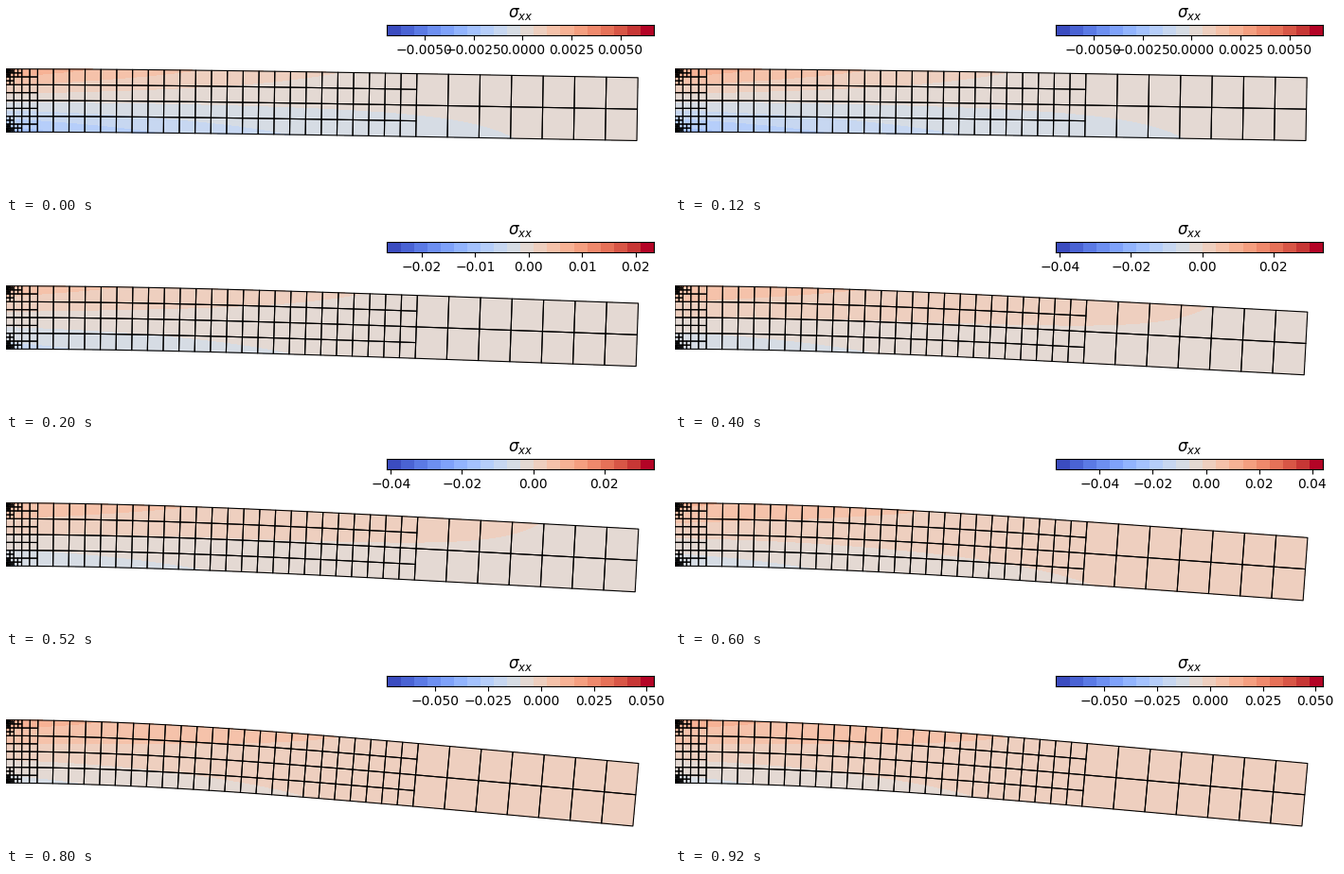
A matplotlib script that plays this animation: 700 px wide and 200 px high, repeating every 1 s.

```python
import numpy as np
import matplotlib.pyplot as plt
from matplotlib.animation import FuncAnimation
from matplotlib.collections import PolyCollection

WIDTH, HEIGHT, DPI = 700, 200, 100
UNIT = 200 / 3            # pixels per beam height
LENGTH = 10 * UNIT
MID_Y = 100
TIP_STEP = 9.15           # tip deflection added per load step
STRESS_STEP = 0.0026      # root bending stress added per load step
BANDS = 20

# stress minimum, stress maximum, tick spacing, decimals
SCALES = [
    (-0.00690, 0.00671, 0.0025, 4),
    (-0.02645, 0.02345, 0.01, 2),
    (-0.04100, 0.03390, 0.02, 2),
    (-0.05630, 0.04400, 0.02, 2),
    (-0.07290, 0.05350, 0.025, 3),
]

cmap = plt.get_cmap("coolwarm", BANDS)


def needs_split(x, y, size):
    if size > 0.25:
        return x < 6.5
    if size > 0.125:
        return x < 0.5
    edge = min(y, 1 - y - size)
    return size > 0.02 and x + edge < 1.9 * size


def refine(x, y, size):
    """Yield the leaf cells of the adaptive grid."""
    if not needs_split(x, y, size):
        yield x, y, size
        return
    half = size / 2
    for dx in (0, half):
        for dy in (0, half):
            yield from refine(x + dx, y + dy, half)


def corners(x, y, size):
    return [(x, y), (x + size, y), (x + size, y + size), (x, y + size)]


cells = np.array([
    corners(*cell)
    for i in range(20) for j in range(2)
    for cell in refine(i / 2, j / 2, 0.5)
]) * UNIT

arc = np.linspace(0, 1, 401)
shape = 0.99 * (6 * arc**2 - 4 * arc**3 + arc**4) / 3 + 0.01 * (2 * arc - arc**2)


def bend(x, y, load):
    """Move rest points to their place on the cantilever under uniform load."""
    s = x / LENGTH
    sag = load * TIP_STEP * shape
    slope = np.gradient(sag, arc * LENGTH)
    step = (slope[1:]**2 + slope[:-1]**2) / 4 * LENGTH / 400
    shortening = np.concatenate([[0], np.cumsum(step)])
    angle = np.arctan(np.interp(s, arc, slope))
    offset = y - UNIT / 2
    return (x - np.interp(s, arc, shortening) - offset * np.sin(angle),
            MID_Y + np.interp(s, arc, sag) + offset * np.cos(angle))


def stress(x, y, load, low, high):
    eta = 1 - 2 * y / UNIT
    bending = load * STRESS_STEP * (1 - x / LENGTH)**2 * eta
    top = high * np.exp(-np.hypot(x, y) / 2)
    bottom = low * np.exp(-np.hypot(x, UNIT - y) / 2)
    return np.clip(bending + top + bottom, low, high)


rest_x, rest_y = np.meshgrid(
    np.concatenate([np.arange(0, 20, 0.5), np.linspace(20, LENGTH, 320)]),
    np.linspace(0, UNIT, 134))

fig = plt.figure(figsize=(WIDTH / DPI, HEIGHT / DPI), dpi=DPI, facecolor="white")
beam_ax = fig.add_axes([0, 0, 1, 1])
bar_ax = fig.add_axes([402.5 / WIDTH, 1 - 30.5 / HEIGHT, 281.5 / WIDTH, 10 / HEIGHT])


def draw_beam(load, low, high):
    beam_ax.clear()
    beam_ax.set(xlim=(0, WIDTH), ylim=(HEIGHT, 0))
    beam_ax.axis("off")
    beam_ax.contourf(*bend(rest_x, rest_y, load),
                     stress(rest_x, rest_y, load, low, high),
                     levels=np.linspace(low, high, BANDS + 1), cmap=cmap)
    outlines = np.stack(bend(cells[..., 0], cells[..., 1], load), axis=-1)
    beam_ax.add_collection(PolyCollection(
        outlines, facecolors="none", edgecolors="black", linewidths=0.8))


def draw_bar(low, high, spacing, decimals):
    bar_ax.clear()
    bar_ax.pcolormesh(np.linspace(low, high, BANDS + 1), [0, 1],
                      np.arange(BANDS)[None], cmap=cmap)
    ticks = spacing * np.arange(np.ceil(low / spacing), np.floor(high / spacing) + 1)
    labels = [f"{t + 0.0:.{decimals}f}".replace("-", "\u2212") for t in ticks]
    bar_ax.set_xticks(ticks, labels)
    bar_ax.set_yticks([])
    bar_ax.set_xlim(low, high)
    bar_ax.set_title(r"$\sigma_{xx}$")


def update(frame):
    low, high, spacing, decimals = SCALES[frame]
    draw_beam(frame + 1, low, high)
    draw_bar(low, high, spacing, decimals)
    return []


anim = FuncAnimation(fig, update, frames=len(SCALES), interval=200,
                     init_func=lambda: [], repeat=True, repeat_delay=0)
plt.show()
```
